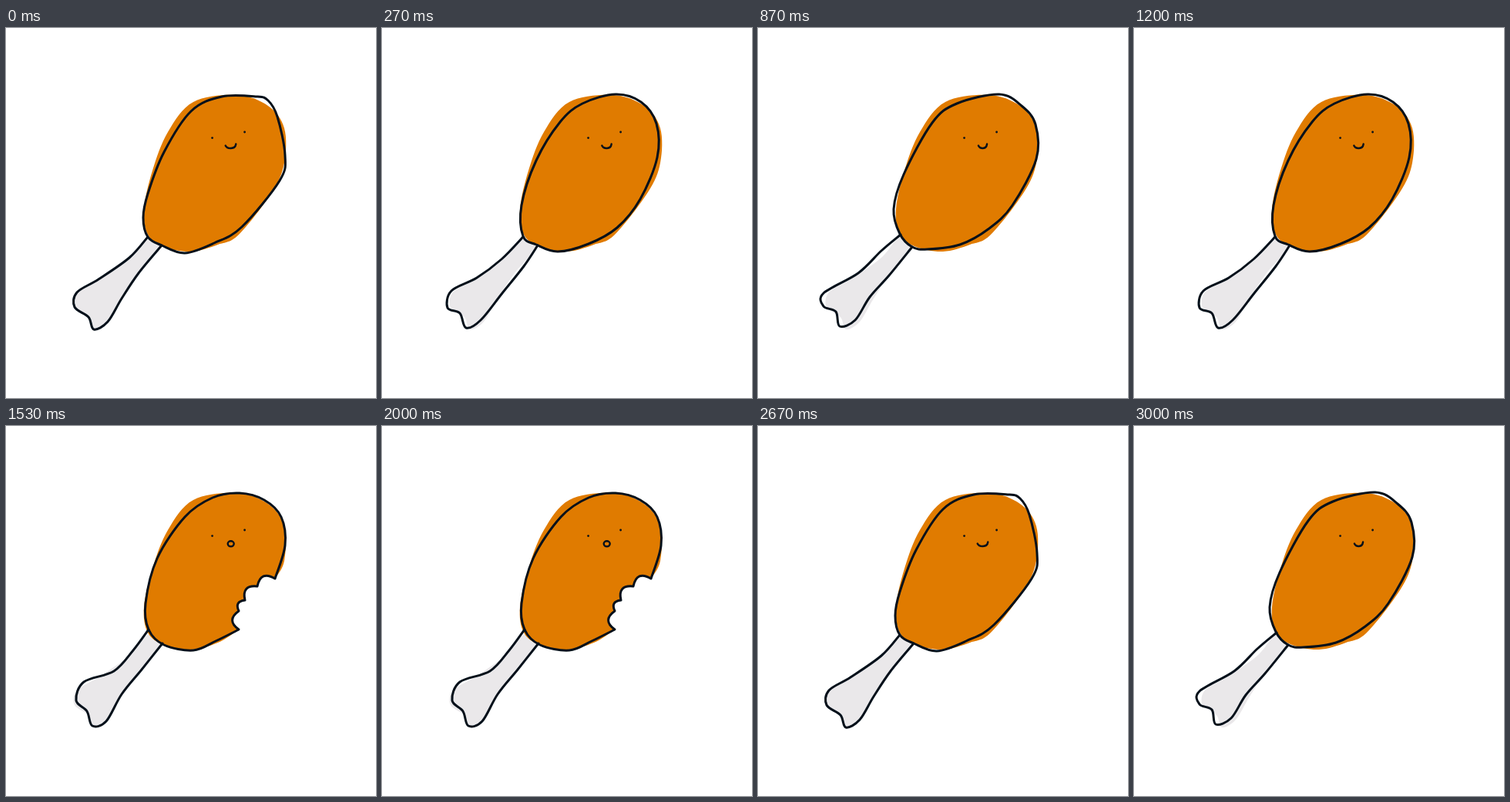
An HTML page with a canvas that plays this animation: 480 by 480 pixels, repeating every 3.07 s.

```html
<!DOCTYPE html>
<html lang="en">
<head>
<meta charset="utf-8">
<title>Drumstick</title>
<style>
html, body { margin: 0; width: 100%; height: 100%; overflow: hidden; background: #fff; }
canvas { display: block; width: 480px; height: 480px; }
</style>
</head>
<body>
<canvas id="stage" width="480" height="480"></canvas>
<script>
const ctx = document.getElementById('stage').getContext('2d');
const LOOP = 3070, STEP = 155, BITE = 1530, HEAL = 2530;
const INK = '#03101a', MEAT = '#e07b00', BONE = '#eae8ea';

const pts = s => s.split(' ').map(p => p.split(',').map(Number));
const blend = (a, b) => a.map((p, i) => p.map((v, k) => (v + b[i][k]) / 2));

// Catmull-Rom curve through a few key points
function curve(p, closed) {
  const n = p.length, path = new Path2D();
  const at = i => closed ? p[(i + n) % n] : p[Math.max(0, Math.min(n - 1, i))];
  path.moveTo(...p[0]);
  for (let i = 0; i < (closed ? n : n - 1); i++) {
    const [a, b, c, d] = [at(i - 1), at(i), at(i + 1), at(i + 2)];
    path.bezierCurveTo(
      b[0] + (c[0] - a[0]) / 6, b[1] + (c[1] - a[1]) / 6,
      c[0] - (d[0] - b[0]) / 6, c[1] - (d[1] - b[1]) / 6, c[0], c[1]);
  }
  return path;
}

// Open curve closed by tooth marks that bulge into the meat between cusps
function bittenCurve(side, cusps) {
  const path = curve([cusps.at(-1), ...side, cusps[0]], false);
  for (let i = 1; i < cusps.length; i++) {
    const [[x0, y0], [x1, y1]] = [cusps[i - 1], cusps[i]];
    path.quadraticCurveTo(
      (x0 + x1) / 2 - .7 * (y1 - y0), (y0 + y1) / 2 + .7 * (x1 - x0), x1, y1);
  }
  path.closePath();
  return path;
}

function smile(w) {
  const l = 291.5 - w, r = 291.5 + w;
  return new Path2D(`M${l},152.5 C${l + 2},157 ${r - 1},158 ${r},150.5`);
}
function gasp(ry, tilt) {
  const path = new Path2D();
  path.ellipse(291.7, 152.8, 4, ry, tilt, 0, 7);
  return path;
}

// Outlines run clockwise from the lower right
const meat = pts('302,268 275,281 240,290 205,284 184,268 179,235 190,185 210,135 243,96 300,87 340,101 361,130 361,175 345,213');
const bodies = [
  '306,258 270,279 232,292 202,282 184,271 178,246 184,215 205,161 240,108 280,89 325,89 340,94 352,115 362,165 355,198',
  '305,259 268,280 228,290 200,281 183,270 181,230 200,172 231,122 260,98 303,86 336,96 356,124 357,168 335,222',
  '300,260 262,281 220,287 200,284 184,267 176,235 189,190 226,123 258,98 313,86 342,101 360,125 361,170 330,230'
].map(pts);
const bones = [
  '184,271 160,298 120,326 92,343 89,362 107,375 114,391 132,381 150,351 172,318 202,282',
  '183,271 155,300 123,324 90,341 85,363 101,370 109,389 128,379 156,344 184,309 202,282',
  '185,268 160,289 130,318 85,344 85,361 101,368 106,387 126,379 145,349 170,321 200,284'
].map(pts);

// Two bitten drawings as [side, cusps, bone]; a third lies halfway
const first = [
  '272,279 243,291 205,284 185,264 181,230 196,172 232,118 268,93 303,87 335,96 357,118 362,155',
  '349,198 326,208 310,226 302,240 302,264',
  '185,264 165,291 140,318 101,332 91,356 105,370 112,389 130,383 150,348 176,316 203,282'
].map(pts);
const last = [
  '265,282 238,285 204,282 182,266 173,238 187,185 220,133 255,103 295,88 335,93 362,119 366,163',
  '355,191 328,206 313,224 302,239 298,266',
  '183,267 152,297 115,321 83,345 88,362 102,367 106,386 124,378 148,346 173,313 204,282'
].map(pts);
const middle = first.map((p, i) => blend(p, last[i]));

const boneFill = curve(bones[0], true);
const wholeFill = curve(meat, true);
const bittenFill = bittenCurve(meat.slice(1, -1), first[1]);

const whole = bodies.map((body, i) => ({
  fill: wholeFill,
  body: curve(body, true),
  bone: curve(bones[i], false),
  mouth: smile(6.8 - .6 * i)
}));
const bitten = [first, middle, last].map(([side, cusps, bone], i) => ({
  fill: bittenFill,
  body: bittenCurve(side, cusps),
  bone: curve(bone, false),
  mouth: gasp(3.5 - .35 * i, -.2 * i)
}));

function poseAt(t) {
  const step = (from, max) => Math.min(max, Math.floor((t - from) / STEP)) % 3;
  if (t < BITE) return whole[step(0, 8)];
  if (t < HEAL) return bitten[step(BITE, 5)];
  return whole[step(HEAL, 2)];
}

function dot(x, y) {
  ctx.beginPath();
  ctx.arc(x, y, 1.4, 0, 7);
  ctx.fill();
}

function draw(now) {
  const p = poseAt(now % LOOP);
  ctx.fillStyle = '#fff';
  ctx.fillRect(0, 0, 480, 480);
  ctx.fillStyle = BONE;
  ctx.fill(boneFill);
  ctx.fillStyle = MEAT;
  ctx.fill(p.fill);
  ctx.strokeStyle = ctx.fillStyle = INK;
  ctx.lineCap = ctx.lineJoin = 'round';
  ctx.lineWidth = 3;
  ctx.stroke(p.bone);
  ctx.stroke(p.body);
  ctx.lineWidth = 2.4;
  ctx.stroke(p.mouth);
  dot(267.6, 142.6);
  dot(309.6, 135);
}

const start = performance.now();
function tick() {
  draw(performance.now() - start);
  requestAnimationFrame(tick);
}
tick();
</script>
</body>
</html>
```
